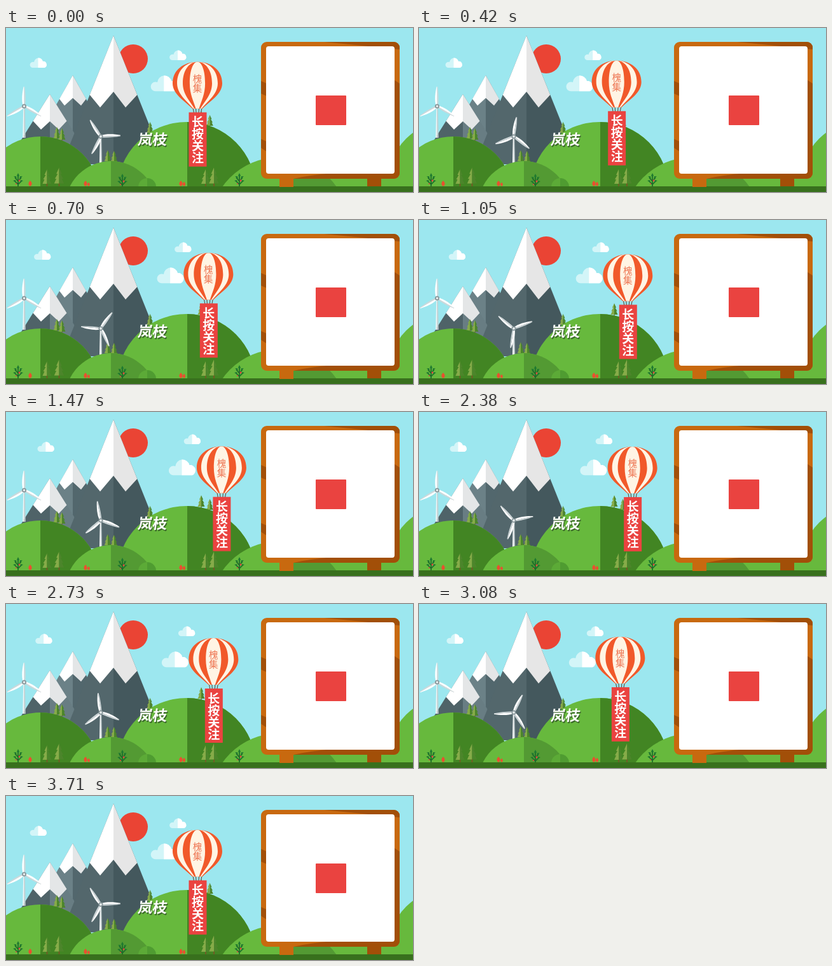
An HTML page for the animation above (3.78 s loop, 640 px wide and 260 px high).

```html
<!DOCTYPE html>
<html lang="zh">
<head>
<meta charset="utf-8">
<title>Balloon over the hills</title>
<style>
  html, body { margin: 0; width: 100%; height: 100%; overflow: hidden; background: #9ce7ef; }
  svg { display: block; width: 640px; height: 260px; }
  text { font-family: "Noto Sans CJK SC", "Noto Sans CJK", sans-serif; text-anchor: middle; }
  .lit { fill: #67b93d; }
  .mid { fill: #539a33; }
  .shade { fill: #428523; }
  .red { fill: #ea4340; }
  .orange { fill: #f1592a; }
  .cream { fill: #fff4e4; }
  .wood { fill: #c8690f; }
  .grain { fill: #a24f08; }
</style>
</head>
<body>
<svg viewBox="0 0 640 260">
  <defs>
    <path id="puff" d="M4.8 15.5a4.600 4.600 0 0 1-.2-9.200q1-.1 2 .3A7 7 0 0 1 20.400 5.400A5.300 5.300 0 0 1 23.200 15.500z"/>
    <clipPath id="east"><rect x="13" y="-1" width="17" height="18"/></clipPath>
    <g id="cloud">
      <use href="#puff" fill="#d3f5f8"/>
      <use href="#puff" fill="#fff" clip-path="url(#east)"/>
    </g>

    <path id="boughs" d="M0-27l-4 9h2l-4 7h2l-3 7h7z"/>
    <g id="pine">
      <path d="M-.8-5h1.600v5h-1.600z" fill="#7b5526"/>
      <use href="#boughs" fill="#86ab49"/>
      <use href="#boughs" transform="scale(-1 1)" fill="#4c852b"/>
    </g>

    <g id="shrub">
      <path d="M0 0V-17M0-3l-6-6M0-3l6-6M0-8l-5-6M0-8l5-6" stroke="#1c6a2a" stroke-width="1.700" fill="none"/>
      <path d="M-8-9l4-1 1 4zM8-9l-4-1-1 4zM-7-16l4 0 1 4zM7-16l-4 0-1 4zM0-21l2 4-2 3-2-3z" fill="#1f7a30"/>
      <circle cx="2" cy="-9" r="1.400" class="red"/>
      <circle cx="-3" cy="-4" r="1" class="red"/>
    </g>
    <path id="bud" d="M0 0c-4-3-3-6 0-9c3 3 4 6 0 9z" fill="#e9502f"/>

    <g id="blade">
      <path d="M-1.500 0C-4.500-9-3-22-.8-31H0V0z" fill="#fff"/>
      <path d="M0 0V-31H.8C2-22 2.500-9 1.500 0z" fill="#cfd7d9"/>
    </g>
    <g id="rotor">
      <use href="#blade"/>
      <use href="#blade" transform="rotate(120)"/>
      <use href="#blade" transform="rotate(240)"/>
      <circle r="3.500" fill="#87969a"/>
      <circle r="1.800" fill="#e9eeee"/>
    </g>
    <g id="tower">
      <path d="M-1.200 0H0V50H-2.200z" fill="#f4f6f6"/>
      <path d="M0 0H1.200L2.200 50H0z" fill="#c3cdcf"/>
    </g>

    <path id="envelope" d="M0 0C22 0 39 13 39 34C39 51 20 62 8 74H-8C-20 62-39 51-39 34C-39 13-22 0 0 0z"/>
    <clipPath id="frame"><rect x="401" y="22" width="218" height="217" rx="9"/></clipPath>
  </defs>

  <rect width="640" height="260" fill="#9ce7ef"/>
  <circle cx="200" cy="49" r="23" fill="#ea4434"/>
  <use id="cloudW" href="#cloud"/>
  <use id="cloudE" href="#cloud"/>
  <use id="cloudBig" href="#cloud"/>

  <!-- mountains -->
  <path d="M105 75L41 190H105z" fill="#6b8187"/>
  <path d="M105 75V190H169z" fill="#52676d"/>
  <path d="M105 75L84 112.500L92 123L105 111z" fill="#fff"/>
  <path d="M105 75V111L118 123L126 112.500z" fill="#e4e6e7"/>
  <path d="M69 105L16 190H69z" fill="#4f6368"/>
  <path d="M69 105V190H122z" fill="#687d83"/>
  <path d="M69 105L42.500 147.500L55 161L69 148z" fill="#fff"/>
  <path d="M69 105V148L83 161L95.500 147.500z" fill="#e4e6e7"/>
  <path d="M169 12L88 216H169z" fill="#53676c"/>
  <path d="M169 12V216H250z" fill="#44585d"/>
  <path d="M169 12L131.700 106L148 126L169 101z" fill="#fff"/>
  <path d="M169 12V101L188 126L206.300 106z" fill="#e6e6e6"/>

  <!-- turbines -->
  <use href="#tower" x="28.500" y="124"/>
  <use href="#rotor" transform="translate(28.500 124)"/>
  <use href="#tower" x="149" y="172"/>

  <!-- hills -->
  <use href="#pine" transform="translate(80 178) scale(.78)"/>
  <use href="#pine" transform="translate(88 180) scale(.78)"/>
  <use href="#pine" transform="translate(226.500 169) scale(.75)"/>
  <use href="#pine" transform="translate(307 153) scale(.78)"/>
  <use href="#pine" transform="translate(320.500 158) scale(.75)"/>
  <circle cx="700" cy="246" r="100" class="lit"/>
  <rect x="420" y="232" width="220" height="20" class="lit"/>
  <circle cx="284" cy="258" r="109" class="lit"/>
  <path d="M285 149A109 109 0 0 1 393 258H285z" class="shade"/>
  <circle cx="430" cy="315" r="110" class="lit"/>
  <path d="M444 206A110 110 0 0 1 520 252H444z" class="mid"/>
  <circle cx="54" cy="265" r="93" class="lit"/>
  <path d="M54 172A93 93 0 0 1 147 265H54z" class="shade"/>
  <use href="#pine" transform="translate(160 214) scale(.75)"/>
  <use href="#pine" transform="translate(170 215) scale(.75)"/>
  <circle cx="165" cy="283" r="72" class="lit"/>
  <path d="M165 211A72 72 0 0 1 237 283H165z" class="mid"/>
  <use id="spin" href="#rotor"/>
  <path d="M208 252a14 14 0 0 1 28 0z" fill="#4f9c31"/>
  <path d="M208 252a14 14 0 0 1 14-14v14z" fill="#5caa37"/>

  <g id="plants">
    <use href="#pine" transform="translate(64.500 251)"/>
    <use href="#pine" transform="translate(83.500 251) scale(1.100)"/>
    <use href="#pine" transform="translate(314 251)"/>
    <use href="#pine" transform="translate(327 251) scale(1.100)"/>
    <use href="#shrub" x="19" y="251"/>
    <use href="#shrub" x="183" y="252"/>
    <use href="#shrub" x="367" y="251"/>
    <use href="#bud" x="38" y="251"/>
    <use href="#bud" x="125" y="251"/>
    <use href="#bud" transform="translate(130 251) scale(.7)"/>
    <use href="#bud" x="275" y="251"/>
    <use href="#bud" transform="translate(280 251) scale(.8)"/>
  </g>
  <rect y="251" width="640" height="9" fill="#38701d"/>

  <g transform="translate(229.500 185) skewX(-8)" font-size="23" font-weight="700">
    <text x="1.500" y="1.500" fill="#3a662a">岚枝</text>
    <text fill="#fff">岚枝</text>
  </g>

  <!-- notice board -->
  <path d="M430 238h22v14h-22z" class="wood"/>
  <path d="M568 238h22v13h-22z" class="grain"/>
  <g clip-path="url(#frame)">
    <rect x="401" y="22" width="218" height="217" class="wood"/>
    <path d="M401 84L410 88V108L401 104zM401 176L410 180V196L401 190zM500 22H619V34L560 28zM610 82L619 88V239H452Q510 226 568 231H610z" class="grain"/>
  </g>
  <rect x="409" y="29" width="202" height="202" rx="4" fill="#fff"/>
  <rect x="487" y="107" width="48" height="47" rx="1" class="red"/>

  <g id="balloon">
    <path d="M-7 73l1.500 8M-2.500 73l.5 8M2.500 73l-.5 8M7 73l-1.500 8" stroke="#65483a" stroke-width="1.100"/>
    <use href="#envelope" class="orange"/>
    <use href="#envelope" class="cream" transform="scale(.82 1)"/>
    <use href="#envelope" class="orange" transform="scale(.59 1)"/>
    <use href="#envelope" class="cream" transform="scale(.31 1)"/>
    <g font-size="14.500" font-weight="300" fill="#ee7653">
      <text y="32">槐</text>
      <text y="47">集</text>
    </g>
    <rect x="-13.500" y="80" width="28" height="86" class="red"/>
    <g font-size="19" font-weight="700" fill="#fff">
      <text x=".5" y="102.500">长</text>
      <text x=".5" y="121.500">按</text>
      <text x=".5" y="140.500">关</text>
      <text x=".5" y="159.500">注</text>
    </g>
  </g>
</svg>
<script>
  const STEP = 70, COUNT = 54, LAST = COUNT - 1;
  const el = id => document.getElementById(id);
  const [balloon, spin, cloudW, cloudE, cloudBig] =
    ['balloon', 'spin', 'cloudW', 'cloudE', 'cloudBig'].map(el);

  // There-and-back progress: soft blends linear with a cosine ease, lift bows it upwards.
  const drift = (u, soft, lift) =>
    u + soft * ((1 - Math.cos(Math.PI * u)) / 2 - u) + lift * Math.sin(Math.PI * u);

  const place = (node, x, y, more = '') =>
    node.setAttribute('transform', `translate(${x.toFixed(2)} ${y.toFixed(2)}) ${more}`);

  function draw(now) {
    const n = Math.floor(now / STEP) % COUNT;
    const u = 1 - Math.abs(2 * n / LAST - 1);
    const p = drift(u, 0.3, 0.03);
    place(balloon, 301 + 45 * p, 53.7 - 1.8 * Math.sin(2 * Math.PI * p) - 0.7 * p);
    place(cloudW, 37.5 + 14 * drift(u, 0, 0.09), 47.5);
    place(cloudE, 257 + 25 * drift(u, 1, 0.01), 35.5);
    place(cloudBig, 227.5 + 31.5 * drift(u, 1, 0), 75.5, 'scale(1.6)');
    place(spin, 149, 172, `rotate(${(n * 360 / LAST - 32.5).toFixed(2)})`);
  }

  const start = performance.now();
  function tick() {
    draw(performance.now() - start);
    requestAnimationFrame(tick);
  }
  tick();
</script>
</body>
</html>
```
